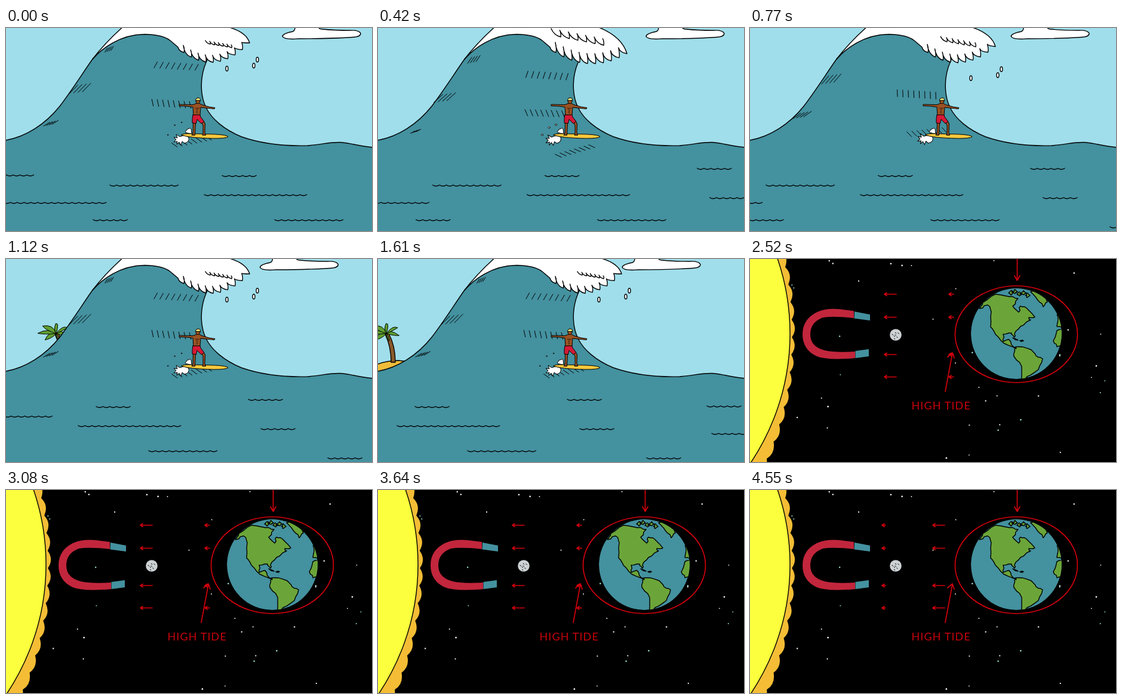
These frames come from a looping animation (613 by 340 pixels, 4.62 s). An HTML page:

```html
<!DOCTYPE html>
<html lang="en">
<head>
<meta charset="utf-8">
<title>Waves and tides</title>
<style>
html, body { margin: 0; width: 100%; height: 100%; overflow: hidden; background: #000; }
svg { display: block; width: 100%; height: 100%; }
.ink { stroke: #000; stroke-width: 1.4; stroke-linejoin: round; stroke-linecap: round; }
.thin { stroke-width: 1; }
.line { fill: none; }
.red { fill: none; stroke: #d3000c; stroke-width: 1.7; stroke-linecap: round; stroke-linejoin: round; }
.white { fill: #fff; }
.sea { fill: #44919f; }
.skin { fill: #9a5223; }
.land { fill: #6ba539; }
text { font: 400 18px Lato, "Open Sans", sans-serif; letter-spacing: 1.1px; fill: #c8000b; }
</style>
</head>
<body>
<svg viewBox="0 0 613 340" preserveAspectRatio="none">
  <defs>
    <clipPath id="globe"><circle cx="446" cy="125" r="76"/></clipPath>
  </defs>

  <g id="surf">
    <rect width="613" height="340" fill="#a0deeb"/>
    <path id="cloud" class="ink white" d="M484 -4Q485 4 480 6Q464 9 463 14Q466 20 490 18Q540 18 580 15.500Q594 15 594 9Q591 3 576 4Q550 4 530 2Q523 2 523 -4Z"/>
    <g id="island">
      <path class="ink" fill="#f0bd3b" d="M-38 70Q-20 48 20 47Q58 50 78 64V70Z"/>
      <path class="ink" fill="#8a5a2b" d="M-2 3Q8 24 8 50H15Q15 22 4 2Z"/>
      <g id="leaves" class="ink thin" fill="#5f9f31"></g>
    </g>
    <path class="ink sea" d="M-3 188.500C33 183 66 161 90 131C112 102 128 76 145 52C165 28 200 6 260 6Q300 14 345 35Q337 52 332 66C324 92 327 117 335 133C344 152 365 170 394 182C425 193 465 198 505 197C530 195 542 191 560 191.500C580 193 590 198 616 200V345H-3Z"/>
    <path id="foam" class="ink white"/>
    <path id="marks" class="ink thin line"/>
    <g id="drops" class="ink white"></g>
    <path id="ripples" class="ink line"/>
    <g class="ink thin">
      <g id="specks" class="white"></g>
      <path class="white" d="M301 175q-1 -4 2 -4q1 -4 3 -2q2 -3 4 0l1 8z"/>
      <path id="wake" class="white" d="M306 183Q308 191 299 193L295 190L293 196L290 191L286 195L287 190L281 191L285 187L281 183L287 184L285 178L291 182Q301 178 306 183Z"/>
      <path fill="#f7c83d" d="M294 179Q296 176.500 311 177L350 178Q370 179 372 182Q369 185 348 185Q304 184 294 179Z"/>
      <path class="skin" d="M313.500 156L313 177L311 179.500H316.500L317.500 157Z"/>
      <path class="skin" d="M326 155L330 163L330 177L329 179.500H334.500L333 175L333.500 160L329 153Z"/>
      <path class="skin" d="M319.500 126L313 128.500L290 128V130.500L303 131L313 132.500L314 146H325L326 133L349 135.500L350 133.500L340 132L328 128.500L323.500 126Z"/>
      <path fill="#d51936" d="M313 145.500H325L326 149L332 157L327 160L320 153L318.500 160L312 159Q311.500 151 313 145.500Z"/>
      <ellipse class="skin" cx="321.500" cy="122" rx="3.500" ry="4.600"/>
      <path fill="#eadf78" d="M317.500 121Q318 117 322 117Q326 117 325.500 121Z"/>
      <path class="line" stroke-width=".7" d="M317 134q2 2 3.500 0q2 2 3.500 0M320 136v7"/>
    </g>
  </g>

  <g id="space">
    <rect width="613" height="340"/>
    <g id="stars"></g>
    <path id="corona" class="ink" fill="#f4bd35"/>
    <circle class="ink" cx="-321" cy="125" r="388" fill="#fbff3d"/>
    <path fill="#c2263c" d="M174 87L150 84Q128 82 112 89Q88 101 88 126Q88 152 112 163Q130 170 176 166V155Q142 157 125 153Q101 147 101 126Q101 106 122 98Q140 95 174 99Z"/>
    <path class="sea" d="M175 88L201 93V103L174.500 99.500ZM176.500 154L199 151V163L176.500 166Z"/>
    <circle cx="244" cy="127" r="9.800" fill="#cdd2d4"/>
    <path id="craters" class="ink thin line"/>
    <g clip-path="url(#globe)">
      <circle class="sea" cx="446" cy="125" r="76"/>
      <path id="land" class="ink land"/>
    </g>
    <ellipse class="red" cx="446" cy="126" rx="102.500" ry="81"/>
    <path class="red" d="M447.500 -2V35M443 28L447.500 36L452 28M327 222L339 158M331 164L339 157L342 166"/>
    <path id="pull" class="red"/>
    <text x="270.500" y="252">HIGH TIDE</text>
  </g>
</svg>
<script>
const FRAME = 70, FRAMES = 66, CUT = 32, POSE = 131.25;
const $ = id => document.getElementById(id);
const draw = (id, d) => $(id).setAttribute('d', d);
const move = (id, x, y) => $(id).setAttribute('transform', `translate(${x} ${y})`);
const times = (n, f) => Array.from({ length: n }, (_, i) => f(i)).join('');
const ellipse = (x, y, rx, ry) => `<ellipse cx="${x}" cy="${y}" rx="${rx}" ry="${ry}"/>`;

function seeded(s) {
  return () => (s = s * 16807 % 2147483647) / 2147483647;
}

// The crest stretches from k = 0 to k = 1 and snaps back
function crest(k) {
  const count = 10;
  let d = 'M145 52C160 35 190 11 232 10.500Q262 11 275 21L288 32';
  let gap = [288, 32];
  for (let i = 0; i < count; i++) {
    const t = i / (count - 1);
    const x = 298 + (110 + 9 * k) * t;
    const y = 41 + (80 - 6 * k) * t - (96 - 24 * k) * t * t;
    d += `Q${gap[0] + 2} ${gap[1] + (y - gap[1]) * .8} ${x} ${y}`;
    gap = [x - 1, y - 12 - 5 * k];
    if (i < count - 1) d += `Q${x + 1.5} ${y - 6} ${gap}`;
  }
  d += `Q${402 + 6 * k} ${4 + 8 * k} 362 -4H198C180 12 162 30 145 52Z`;

  // loose feathers inside the foam
  const step = 8 + 8 * k, size = 6 + 8 * k;
  d += `M${334 - 44 * k} ${21 - 20 * k}` + times(6, () =>
    `q${step * .3} ${size * .8} ${step} ${size}q1 ${-size * .5} ${-step * .1} ${-size * .8}`);
  draw('foam', d);
}

// A row of strokes centred at x, y
function row(x, y, wide, rise, size, degrees, count) {
  const a = degrees * Math.PI / 180, sx = size * Math.cos(a), sy = size * Math.sin(a);
  return times(count, i => {
    const k = i / (count - 1) - .5;
    return `M${x + wide * k - sx / 2} ${y + rise * k - sy / 2}l${sx} ${sy}`;
  });
}

// Strokes climb the back and the face of the wave in steps u
function marks(pose) {
  let d = '';
  for (let u = (pose + 1) % 4; u <= 9; u += 4) {
    const swell = Math.sin(Math.PI * u / 9);
    d += row(63 + 12.2 * u, 173 - 13.2 * u - .23 * u * u, 10 + 12 * swell, -3,
      8 + 12 * swell, -28 - 3.5 * u, 4);
    d += row(277 + 53 * Math.max(0, 1 - u / 5) ** 2 + 2 * Math.max(0, u - 5), 206 - 15.8 * u,
      56 + 1.4 * u, Math.min(4, 4.5 * u - 16), 11.5, 25 + 10.5 * u, 8);
  }
  draw('marks', d);
}

// Drops fall from the lip, specks fly off the board
function spray(pose) {
  const fall = 16 * pose;
  $('drops').innerHTML = pose > 1 ? '' :
    ellipse(370, 68 + fall, 2, 4) + ellipse(415, 63 + fall, 2, 4) + ellipse(421, 53 + fall, 2, 4);
  const age = (pose + 2) % 4, r = 2.4 - .8 * age;
  $('specks').innerHTML = age > 2 ? '' : times(3, i =>
    ellipse(275 + 11.5 * i - 4 * (age - 1), 179 - 17 * Math.sin(i * .8) - 4 * (age - 1) * (i > 0), r, r * .8));
  $('wake').setAttribute('transform', `rotate(${4 * Math.sin(pose * Math.PI / 2)} 302 185)`);
}

// Ripples: x, y, length in bumps
const sea = [[-68,247,10],[362,248,5],[851,247,5],[174,264,10],[332,280,15],[-4,293,15],[859,293,15],
  [146,322,5],[450,322,10],[617,236,5],[638,285,5],[750,334,5]];

function ripples(n) {
  const shift = 12.7 * n + 8 * (1 - Math.exp(-n / 4));
  draw('ripples', sea.map(([x, y, bumps]) =>
    `M${x - shift} ${y - 1}` + 'q5.700 3.600 11.450 0'.repeat(bumps)).join(''));
}

// Arrows slide left, shortened at both ends of their lane
function arrows(n) {
  let d = '';
  for (let x = 333 - 27 * (n % 4); x > 195; x -= 108) {
    const head = Math.max(x, 221), tail = Math.min(Math.max(x + 20, 227), 341);
    for (const y of [59, 97.5, 160, 197.5])
      d += `M${tail} ${y}H${head}m4 -2.500l-4 2.500l4 2.500`;
  }
  draw('pull', d);
}

// Closed outline through key points, with a ragged edge
function coast(points, rnd) {
  return 'M' + points.map(([x, y], i) => {
    const [u, v] = points[(i + 1) % points.length];
    const cut = [1 / 3, 2 / 3].map(k =>
      `L${x + (u - x) * k + 3 * rnd() - 1.5} ${y + (v - y) * k + 3 * rnd() - 1.5}`).join('');
    return `${x} ${y}${cut}`;
  }).join('L') + 'Z';
}

function build() {
  $('leaves').innerHTML = times(7, i => {
    const a = .35 + i * 2 * Math.PI / 7, x = 27 * Math.cos(a) - 4, y = 15 * Math.sin(a);
    return `<path d="M0 2Q${x * .4 - y * .4} ${y * .5 - 9} ${x} ${y}Q${x * .6 + y * .3} ${y * .6 + 3} 0 2Z"/>`;
  });

  // scalloped rim, thicker away from the middle
  const rim = (i, out) => {
    const a = -.36 + i * .075, r = 392 + 60 * Math.sin(a) ** 2 + out;
    return `${-321 + r * Math.cos(a)} ${125 + r * Math.sin(a)}`;
  };
  draw('corona', `M-5 -20L${rim(0, 0)}` + times(14, i => `Q${rim(i + .5, 10)} ${rim(i + 1, 0)}`) + 'L-5 360Z');

  const rnd = seeded(77);
  $('stars').innerHTML = times(48, i =>
    `<circle cx="${70 + 525 * rnd()}" cy="${338 * rnd()}" r="${.9 + .5 * rnd()}" fill="${i % 4 ? '#f2f6f6' : '#9fe6dc'}"/>`);

  draw('craters', times(7, i => {
    const a = i * 2.4, r = 2.6 * Math.sqrt(i);
    return `M${243 + r * Math.cos(a)} ${127 + r * Math.sin(a)}l1.5 1`;
  }));

  const america = [[384,83],[390,73],[411,59],[434,63],[449,66],[440,79],[450,89],[453,79],[463,82],[477,97],
    [467,98],[470,102],[453,113],[444,123],[443,131],[438,124],[424,126],[424,138],[434,135],[441,147],
    [446,150],[425,141],[411,126],[403,114],[404,88],[398,77]];
  const south = [[443,151],[449,147],[471,152],[479,162],[490,167],[483,185],[464,197],[459,206],[453,206],[455,180],[442,163]];
  const greenland = [[470,55],[480,50],[492,57],[498,72],[491,80],[482,69]];
  const africa = [[526,117],[514,120],[508,137],[514,147],[526,145]];
  const europe = [[526,93],[514,94],[516,101],[514,113],[526,114]];
  let d = [america, south, greenland, africa, europe].map(p => coast(p, rnd)).join('');
  for (let i = 0; i < 5; i++) {
    const x = 437 + 7 * i, y = 57 - 3 * (i % 2) + i;
    d += coast([[x - 4, y], [x, y - 4], [x + 4, y], [x, y + 3]], rnd);
  }
  draw('land', d + 'M440 132l5 2l4 2l-5 -1zM452 137l4 -1l2 1l-3 1z');
}

function render(now) {
  const n = Math.floor(now / FRAME) % FRAMES;
  const surfing = n < CUT;
  $('surf').style.display = surfing ? '' : 'none';
  $('space').style.display = surfing ? 'none' : '';
  if (surfing) {
    const pose = Math.floor(n * FRAME / POSE) % 4;
    move('cloud', -2.35 * n, 0);
    move('island', 244 - 10 * n, 123);
    crest(pose / 3);
    marks(pose);
    spray(pose);
    ripples(n);
  } else {
    arrows(n);
  }
}

function tick() {
  render(performance.now());
  requestAnimationFrame(tick);
}

build();
tick();
</script>
</body>
</html>
```
